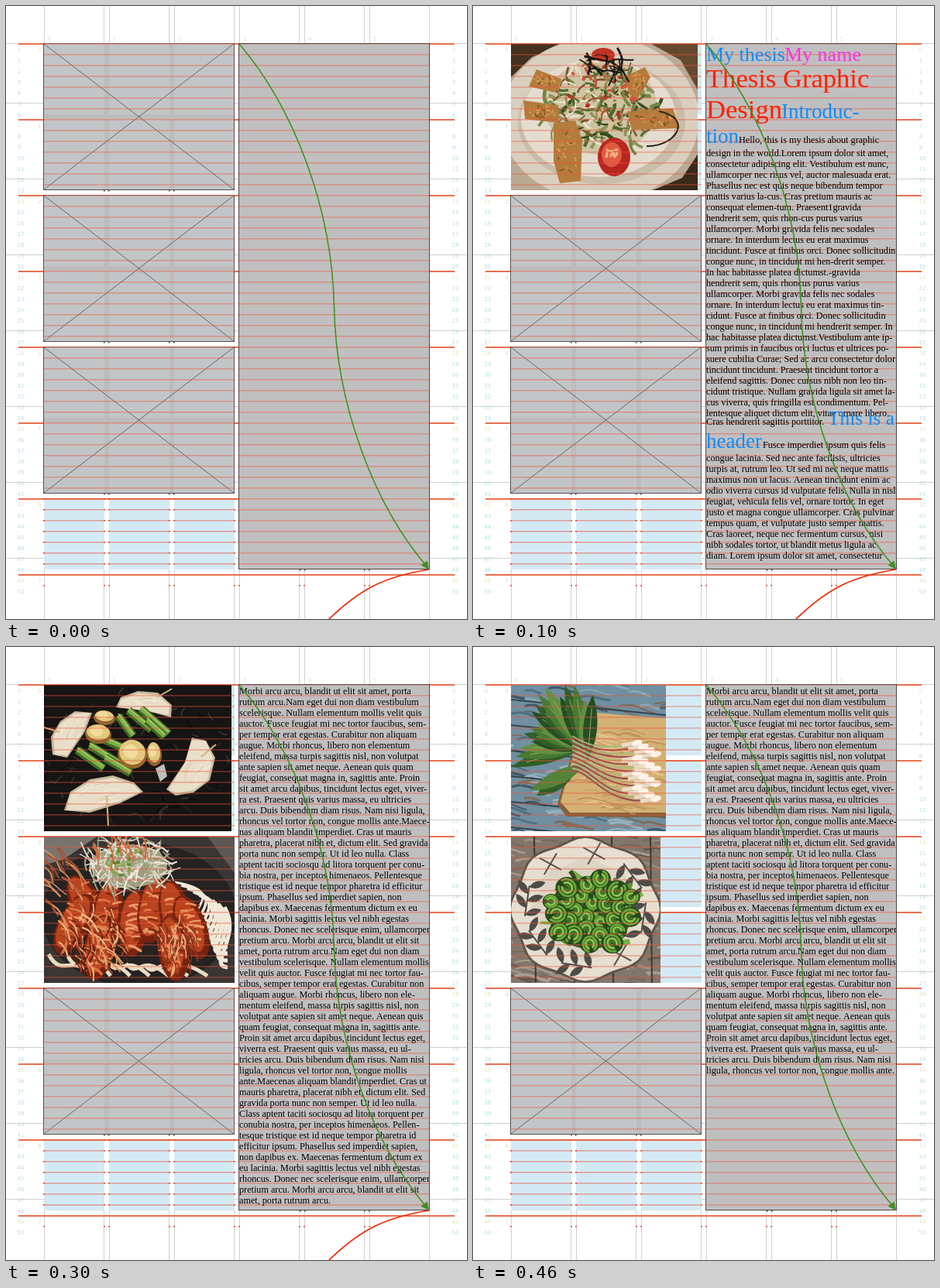
Recreate the animation shown at these times as an HTML page with a canvas. Size 595 px wide and 792 px high, loop 500 ms.

```html
<!DOCTYPE html>
<html lang="la">
<head>
<meta charset="utf-8">
<title>Thesis grid</title>
<style>
html, body { margin: 0; width: 100%; height: 100%; overflow: hidden; background: #fff; }
canvas { display: block; }
</style>
</head>
<body>
<canvas id="stage" width="595" height="792"></canvas>
<script>
const ctx = document.getElementById('stage').getContext('2d');
const SERIF = '"Liberation Serif", "Times New Roman", serif';
const BLUE = '#0c8cf8', PINK = '#ff30e4', RED = '#ff2000';
const LEFT = 49, TOP = 49, ROW = 98, LEAD = 14, TEXT_X = 301;
const columns = [0, 1, 2, 3, 4, 5].map(i => LEFT + 84 * i);

let seed = 1;
const random = () => (seed = seed * 16807 % 2147483647) / 2147483647;
const between = (a, b) => a + (b - a) * random();
const pick = list => list[Math.floor(random() * list.length)];

function rect(color, x, y, w, h) {
  ctx.fillStyle = color;
  ctx.fillRect(x, y, w, h);
}
function poly(color, ...p) {
  ctx.fillStyle = color;
  ctx.beginPath();
  for (let i = 0; i < p.length; i += 2) ctx.lineTo(p[i], p[i + 1]);
  ctx.closePath();
  ctx.fill();
}
function oval(color, x, y, rx, ry, turn = 0) {
  ctx.fillStyle = color;
  ctx.beginPath();
  ctx.ellipse(x, y, rx, ry, turn, 0, 7);
  ctx.fill();
}
function curve(color, width, x, y, ...c) {
  ctx.strokeStyle = color;
  ctx.lineWidth = width;
  ctx.beginPath();
  ctx.moveTo(x, y);
  for (let i = 0; i < c.length; i += 6) ctx.bezierCurveTo(...c.slice(i, i + 6));
  ctx.stroke();
}
function line(color, width, x1, y1, x2, y2) {
  ctx.strokeStyle = color;
  ctx.lineWidth = width;
  ctx.beginPath();
  ctx.moveTo(x1, y1);
  ctx.lineTo(x2, y2);
  ctx.stroke();
}
function write(text, x, y, size, color, font = SERIF) {
  ctx.font = `${size}px ${font}`;
  ctx.fillStyle = color;
  ctx.fillText(text, x, y);
}
// Random strokes inside an ellipse
function strands(n, x, y, rx, ry, colors, length, width, turn = 0, spread = 3.2) {
  for (let i = 0; i < n; i++) {
    const a = random() * 6.283, r = Math.sqrt(random());
    const px = x + rx * r * Math.cos(a), py = y + ry * r * Math.sin(a);
    const b = turn + between(-spread, spread), l = length * between(.4, 1);
    const dx = Math.cos(b) * l / 2, dy = Math.sin(b) * l / 2;
    curve(pick(colors), width * between(.6, 1.2), px - dx, py - dy,
      px + dy * .4, py - dx * .4, px + dy * .3, py, px + dx, py + dy);
  }
}
function leaf(color, x, y, length, width, turn) {
  ctx.save();
  ctx.translate(x, y);
  ctx.rotate(turn);
  ctx.fillStyle = color;
  ctx.beginPath();
  ctx.moveTo(0, 0);
  ctx.quadraticCurveTo(length * .5, -width, length, 0);
  ctx.quadraticCurveTo(length * .5, width, 0, 0);
  ctx.fill();
  ctx.restore();
}

function salad() {
  rect('#b9aa94', 49, 49, 246, 190);
  poly('#46301f', 49, 49, 118, 49, 76, 66, 49, 92);
  poly('#65492f', 230, 49, 291, 49, 291, 110, 268, 70);
  poly('#3b2919', 291, 190, 291, 238, 232, 238, 270, 222);
  oval('#d9cfbf', 164, 146, 128, 106);
  oval('#c9bda9', 166, 150, 108, 80);
  oval('#e4dccf', 162, 145, 100, 76);
  oval('#cfc3a6', 165, 130, 72, 62);
  strands(90, 165, 135, 80, 58, ['#4b6a2c', '#6f8741', '#334d20', '#88965b'], 26, 4);
  strands(130, 165, 125, 62, 58, ['#eee4cf', '#d6bd91', '#a68353', '#78552f', '#526c30'], 24, 2.5);
  strands(22, 168, 105, 45, 40, ['#a83425', '#c6583a'], 10, 5);
  const crust = '#b47b3b';
  poly(crust, 82, 82, 114, 94, 107, 112, 72, 104);
  poly(crust, 65, 122, 110, 128, 111, 151, 67, 146);
  poly(crust, 104, 151, 132, 148, 141, 173, 139, 226, 112, 229, 104, 200);
  poly(crust, 198, 90, 222, 79, 229, 92, 212, 120, 201, 114);
  poly(crust, 199, 136, 258, 132, 267, 158, 205, 160);
  for (const [x, y, w, h] of [[92, 97, 14, 9], [88, 137, 18, 9], [122, 189, 13, 32], [213, 99, 9, 11], [233, 146, 25, 9]])
    strands(26, x, y, w, h, ['#d2a35c', '#8a5526', '#c48c4a'], 7, 2);
  oval('#c03225', 168, 63, 15, 9);
  oval('#b7261f', 182, 195, 21, 25);
  oval('#e05a42', 179, 192, 13, 16);
  strands(8, 180, 192, 8, 12, ['#f0b184'], 9, 3);
  strands(16, 168, 78, 26, 15, ['#171412'], 36, 2.5, .8, 1);
  curve('#28251b', 2, 240, 136, 285, 145, 262, 182, 224, 181);
}

function pastry(x, y, r, turn) {
  for (const [scale, color] of [[1, '#d8ad73'], [.91, '#f2dfba']]) {
    const points = [];
    for (let i = 0; i < 16; i++) {
      const a = turn + i * Math.PI / 8, q = r * scale * (i % 2 ? .74 : between(.95, 1.12));
      points.push(x + q * Math.cos(a), y + q * .78 * Math.sin(a));
    }
    poly(color, ...points);
  }
  strands(38, x, y, r * .7, r * .48, ['#dca45c', '#f8e9c9', '#b9692c'], 22, 5);
  oval('#c77a36', x, y, r * .49, r * .32, turn);
  oval('#693516', x, y, r * .33, r * .21, turn);
  strands(28, x, y, r * .4, r * .25, ['#b36028', '#40200f', '#d99a55', '#7c812f'], 10, 3);
}
function parcels() {
  rect('#17120f', 49, 49, 246, 183);
  oval('#494641', 165, 140, 132, 102);
  oval('#211c18', 166, 137, 123, 94);
  poly('#6c5b49', 49, 49, 82, 49, 64, 71, 49, 78);
  pastry(180, 82, 48, .3);
  pastry(119, 101, 51, .8);
  pastry(101, 157, 59, .2);
  pastry(220, 151, 62, .65);
  poly('#e9c895', 162, 119, 199, 137, 185, 202, 168, 174);
  strands(30, 173, 148, 46, 55, ['#b2601f', '#efd8a9', '#d08c40'], 25, 4);
}

function grill() {
  rect('#171414', 49, 49, 243, 190);
  strands(90, 170, 145, 120, 90, ['#252121', '#0d0b0b', '#37302c'], 16, 2);
  const onion = '#e9dec8', rim = '#c9b89a';
  for (const [color, inset] of [[rim, 0], [onion, 3]]) {
    poly(color, 142 + inset, 78, 148, 65 + inset, 170, 57 + inset, 196, 59 + inset, 214 - inset, 75, 213 - inset, 91 - inset, 180, 82);
    poly(color, 60 + inset, 139, 58 + inset, 116, 70, 96 + inset, 89, 83 + inset, 111 - inset, 85, 102 - inset, 109, 79, 143 - inset);
    poly(color, 75 + inset, 211, 83, 187 + inset, 108, 171 + inset, 138, 166 + inset, 165, 175 + inset, 177 - inset, 187, 147, 202 - inset, 108, 214 - inset);
    poly(color, 207 + inset, 184, 231, 149, 240, 117 + inset, 258, 121, 270 - inset, 143, 263 - inset, 172, 242, 188 - inset, 219, 192 - inset);
  }
  for (const [x, y, r, a] of [[178, 74, 24, .1], [83, 113, 22, -1], [126, 190, 35, -.2], [247, 157, 27, -1]])
    strands(9, x, y, r * .6, r * .4, ['#d4c5a9', '#f7efdc'], r, 1, a, .25);
  const sticks = [[145, 89, 164, 115], [158, 82, 188, 107], [174, 80, 210, 112], [92, 133, 126, 157],
    [108, 127, 147, 151], [112, 113, 157, 133], [128, 143, 161, 163], [182, 95, 205, 116]];
  for (const s of sticks) {
    line('#3d6d25', 11, ...s);
    line('#7eae48', 6, s[0], s[1] - 1, s[2], s[3] - 1);
    line('#acc96a', 1.5, s[0], s[1] - 3, s[2], s[3] - 3);
  }
  for (const [x, y, rx, ry, a] of [[127, 90, 14, 9, .1], [119, 111, 17, 12, .1], [163, 137, 19, 18, .4], [191, 137, 10, 15, -.1]]) {
    oval('#93652d', x, y + 2, rx, ry, a);
    oval('#e2c77d', x, y - 1, rx - 2, ry - 2, a);
    oval('#f0dc9d', x - 2, y - 2, rx * .5, ry * .5, a);
  }
  poly('#bfc0bd', 193, 157, 204, 151, 208, 167, 199, 174);
  line('#d8b47a', 2, 49, 104, 70, 110);
  line('#d8b47a', 2, 130, 192, 132, 231);
  line('#d8b47a', 2, 252, 142, 271, 126);
  line('#d8b47a', 2, 195, 65, 214, 54);
}

function prawns() {
  rect('#393634', 49, 245, 246, 189);
  poly('#79746f', 49, 245, 117, 245, 75, 274, 49, 282);
  poly('#5d5853', 260, 245, 295, 245, 295, 292);
  oval('#252322', 172, 346, 126, 94);
  for (let i = 0; i < 9; i++)
    curve('#f1e8d7', between(3, 6), 218 + i * 8, 304 + i * 4,
      305, 318 + i * 7, 195 + i * 8, 356 + i * 7, 286, 342 + i * 9);
  for (let i = 0; i < 7; i++)
    curve('#e9dbc2', 5, 55 + i * 25, 397 + i * 3, 72 + i * 25, 430, 92 + i * 20, 393, 110 + i * 25, 425);
  const bodies = [[105, 334, -.5], [132, 346, .1], [165, 357, .1], [190, 340, .15], [218, 344, -.2], [239, 362, -.35], [121, 388, .2], [216, 389, -.1], [88, 358, .5]];
  for (const [x, y, a] of bodies) {
    oval('#77230f', x, y, 20, 43, a);
    oval('#b8431e', x - 2, y - 3, 15, 37, a);
    strands(17, x, y, 13, 34, ['#df7640', '#882b13', '#ed9a68'], 19, 3, a, .5);
  }
  strands(80, 112, 378, 42, 42, ['#d78750', '#63200f', '#efbd87', '#9c3b1e'], 35, 2, 1.2, .7);
  strands(42, 218, 385, 26, 34, ['#e7ad78', '#89341d'], 34, 2, 1.5, .5);
  strands(24, 72, 310, 24, 42, ['#d49467', '#a84c27'], 42, 2, .9, .4);
  oval('#a49a7e', 159, 283, 49, 28);
  strands(130, 158, 281, 57, 34, ['#f1eee3', '#c8c7b8', '#9ba57d', '#e1dac6'], 40, 1.8);
  strands(20, 155, 278, 30, 18, ['#59852d', '#83a849'], 8, 4);
  strands(14, 146, 261, 38, 17, ['#c96f43'], 38, 2, 1.1, .4);
}

function wood(x, y, w, h, base, tones) {
  rect(base, x, y, w, h);
  strands(170, x + w / 2, y + h / 2, w * .72, h * .72, tones, 48, 3, .12, .08);
}
function ramps() {
  wood(49, 49, 200, 189, '#708fa0', ['#89a8b5', '#526f83', '#806b57', '#9ab2bb', '#3e5869']);
  for (let y = 68; y < 250; y += 33) line('#35444d', 2, 49, y, 249, y + 20);
  poly('#826038', 143, 84, 249, 94, 249, 220, 121, 219, 109, 203);
  poly('#d4b075', 145, 84, 249, 92, 249, 214, 125, 214, 113, 200);
  strands(65, 190, 160, 58, 56, ['#e2c58f', '#bd9355', '#c9a267'], 45, 2, .1, .08);
  const greens = ['#315e27', '#477a32', '#648f43', '#274d23'];
  for (let i = 0; i < 16; i++) {
    const a = Math.PI * (.91 + i * .041), l = between(72, 105);
    leaf(greens[i % 4], 148, 126 + i * 1.3, l, 18, a);
    line('#8faa62', 1, 148, 126 + i * 1.3, 148 + Math.cos(a) * l * .8, 126 + i * 1.3 + Math.sin(a) * l * .8);
  }
  leaf('#315f28', 133, 158, 61, 20, 2.55);
  leaf('#53833a', 145, 152, 79, 18, 2.7);
  for (let i = 0; i < 16; i++) {
    const y = 126 + i * 4.8, x = 202 + i % 4 * 8;
    curve(i % 2 ? '#9a4c52' : '#a9b878', 2, 128, 115 + i * 3, 153, 130 + i * 2, 170, y + 6, x, y);
    line('#e8dac8', 5, x - 10, y + 1, x + 9, y - 2);
    oval('#fff2e6', x + 10, y - 2, 7, 4, -.2);
  }
}

function ferns() {
  wood(49, 245, 193, 189, '#82766b', ['#9c8f80', '#625950', '#756a60', '#ab9e90']);
  for (let x = 79; x < 242; x += 50) line('#3d3732', 2, x, 245, x + 2, 434);
  const edge = (r, n = 64) => Array.from({ length: n }, (_, i) => {
    const a = i * 2 * Math.PI / n, q = r + 3 * Math.cos(8 * a);
    return [145 + q * Math.cos(a), 339 + q * .96 * Math.sin(a)];
  }).flat();
  poly('#5e554b', ...edge(96));
  poly('#e6decf', ...edge(93));
  poly('#ded4c4', ...edge(67));
  for (let i = 0; i < 8; i++) {
    const a = i * Math.PI / 4 + .15;
    const x = 145 + 76 * Math.cos(a), y = 339 + 73 * Math.sin(a);
    if (i % 4 === 1 || i === 6) {
      for (const turn of [.5, 2.1]) line('#55524a', 2, x - 16 * Math.cos(turn), y - 16 * Math.sin(turn), x + 16 * Math.cos(turn), y + 16 * Math.sin(turn));
      continue;
    }
    line('#4d4c47', 2, x - 20 * Math.sin(a), y + 20 * Math.cos(a), x + 20 * Math.sin(a), y - 20 * Math.cos(a));
    for (let j = -2; j < 3; j++)
      leaf('#4d4c47', x - j * 9 * Math.sin(a), y + j * 9 * Math.cos(a), 22, 9, a + (j % 2 ? .8 : 2.7));
  }
  oval('#3f532b', 151, 344, 54, 46);
  strands(45, 151, 342, 58, 50, ['#314e20', '#5c9135', '#78ad46'], 34, 6);
  for (let i = 0; i < 27; i++) {
    const a = i * 2.4, q = 11 * Math.sqrt(i), x = 153 + q * Math.cos(a), y = 343 + q * .85 * Math.sin(a);
    const r = between(9, 14);
    oval('#28471b', x, y, r + 1, r);
    for (const [k, color] of [[.82, '#65a638'], [.49, '#8bc450'], [.2, '#46752b']]) {
      ctx.strokeStyle = color;
      ctx.lineWidth = 3;
      ctx.beginPath();
      ctx.ellipse(x, y, r * k, r * k * .9, a, 0, 5.6);
      ctx.stroke();
    }
  }
}

const dishes = [
  [],
  [[salad, 49, 241, 189]],
  [[parcels, 49, 246, 182]],
  [[grill, 49, 242, 189], [prawns, 245, 246, 189]],
  [[ramps, 49, 200, 189], [ferns, 245, 193, 189]]
];

const opening = `design in the world.Lorem ipsum dolor sit amet,
consectetur adipiscing elit. Vestibulum est nunc,
ullamcorper nec risus vel, auctor malesuada erat.
Phasellus nec est quis neque bibendum tempor
mattis varius la-cus. Cras pretium mauris ac
consequat elemen-tum. Praesent1gravida
hendrerit sem, quis rhon-cus purus varius
ullamcorper. Morbi gravida felis nec sodales
ornare. In interdum lectus eu erat maximus
tincidunt. Fusce at finibus orci. Donec sollicitudin
congue nunc, in tincidunt mi hen-drerit semper.
In hac habitasse platea dictumst.-gravida
hendrerit sem, quis rhoncus purus varius
ullamcorper. Morbi gravida felis nec sodales
ornare. In interdum lectus eu erat maximus tin-
cidunt. Fusce at finibus orci. Donec sollicitudin
congue nunc, in tincidunt mi hendrerit semper. In
hac habitasse platea dictumst.Vestibulum ante ip-
sum primis in faucibus orci luctus et ultrices po-
suere cubilia Curae; Sed ac arcu consectetur dolor
tincidunt tincidunt. Praesent tincidunt tortor a
eleifend sagittis. Donec cursus nibh non leo tin-
cidunt tristique. Nullam gravida ligula sit amet la-
cus viverra, quis fringilla est condimentum. Pel-
lentesque aliquet dictum elit, vitae ornare libero.`;
const section = `congue lacinia. Sed nec ante facilisis, ultricies
turpis at, rutrum leo. Ut sed mi nec neque mattis
maximus non ut lacus. Aenean tincidunt enim ac
odio viverra cursus id vulputate felis. Nulla in nisl
feugiat, vehicula felis vel, ornare tortor. In eget
justo et magna congue ullamcorper. Cras pulvinar
tempus quam, et vulputate justo semper mattis.
Cras laoreet, neque nec fermentum cursus, nisi
nibh sodales tortor, ut blandit metus ligula ac
diam. Lorem ipsum dolor sit amet, consectetur`;
const subsection = `eros nisl, scelerisque a libero vel, suscipit porttitor
felis. Nulla nec lacinia nisl. Phasellus molestie leo
in sem tristique, et vulputate orci blandit. Ut con-
sequat fringilla iaculis. Proin nulla nibh, dapibus
at eleifend rhoncus, iaculis at leo. Ut bibendum
semper gravida. Sed tincidunt eget lorem in ele-
mentum. Vivamus et ullamcorper sapien. Duis
molestie dignissim pellentesque. Quisque congue
volutpat suscipit.Maecenas aliquam blandit im-
perdiet. Cras ut mauris pharetra, placerat nibh et,
dictum elit. Sed gravida porta nunc non semper.
Ut id leo nulla. Class aptent taciti sociosqu ad lito-
ra torquent per conubia nostra, per inceptos
himenaeos. Pellentesque tristique est id neque
tempor pharetra id efficitur ipsum. Phasellus sed
imperdiet sapien, non dapibus ex. Maecenas fer-
mentum dictum ex eu lacinia. Morbi sagittis lectus
vel nibh egestas rhoncus. Donec nec scelerisque
enim, ullamcorper pretium arcu. Morbi arcu arcu,
blandit ut elit sit amet, porta rutrum arcu.Nam
eget dui non diam vestibulum scelerisque. Nullam
elementum mollis velit quis auctor. Fusce feugiat
mi nec tortor faucibus, semper tempor erat eges-
tas. Curabitur non aliquam augue. Morbi rhoncus,
libero non elementum eleifend, massa turpis sag-
ittis nisl, non volutpat ante sapien sit amet neque.
Aenean quis quam feugiat, consequat magna in,
sagittis ante. Proin sit amet arcu dapibus, tin-
cidunt lectus eget, viverra est. Praesent quis varius
massa, eu ultricies arcu. Duis bibendum diam ris-
us. Nam nisi ligula, rhoncus vel tortor non, congue
mollis ante.Maecenas aliquam blandit imperdiet.
Cras ut mauris pharetra, placerat nibh et, dictum
elit. Sed gravida porta nunc non semper. Ut id leo
nulla. Class aptent taciti sociosqu ad litora
torquent per conubia nostra, per inceptos hime-
naeos. Pellentesque tristique est id neque tempor
pharetra id efficitur ipsum. Phasellus sed imperdi-
et sapien, non dapibus ex. Maecenas fermentum
dictum ex eu lacinia. Morbi sagittis lectus vel nibh
egestas rhoncus. Donec nec scelerisque enim, ul-
lamcorper pretium arcu. Morbi arcu arcu, blandit
ut elit sit amet, porta rutrum arcu.`;
const closing = `Morbi arcu arcu, blandit ut elit sit amet, porta
rutrum arcu.Nam eget dui non diam vestibulum
scelerisque. Nullam elementum mollis velit quis
auctor. Fusce feugiat mi nec tortor faucibus, sem-
per tempor erat egestas. Curabitur non aliquam
augue. Morbi rhoncus, libero non elementum
eleifend, massa turpis sagittis nisl, non volutpat
ante sapien sit amet neque. Aenean quis quam
feugiat, consequat magna in, sagittis ante. Proin
sit amet arcu dapibus, tincidunt lectus eget, viver-
ra est. Praesent quis varius massa, eu ultricies
arcu. Duis bibendum diam risus. Nam nisi ligula,
rhoncus vel tortor non, congue mollis ante.Maece-
nas aliquam blandit imperdiet. Cras ut mauris
pharetra, placerat nibh et, dictum elit. Sed gravida
porta nunc non semper. Ut id leo nulla. Class
aptent taciti sociosqu ad litora torquent per conu-
bia nostra, per inceptos himenaeos. Pellentesque
tristique est id neque tempor pharetra id efficitur
ipsum. Phasellus sed imperdiet sapien, non
dapibus ex. Maecenas fermentum dictum ex eu
lacinia. Morbi sagittis lectus vel nibh egestas
rhoncus. Donec nec scelerisque enim, ullamcorper
pretium arcu. Morbi arcu arcu, blandit ut elit sit
amet, porta rutrum arcu.Nam eget dui non diam
vestibulum scelerisque. Nullam elementum mollis
velit quis auctor. Fusce feugiat mi nec tortor fau-
cibus, semper tempor erat egestas. Curabitur non
aliquam augue. Morbi rhoncus, libero non ele-
mentum eleifend, massa turpis sagittis nisl, non
volutpat ante sapien sit amet neque. Aenean quis
quam feugiat, consequat magna in, sagittis ante.
Proin sit amet arcu dapibus, tincidunt lectus eget,
viverra est. Praesent quis varius massa, eu ul-
tricies arcu. Duis bibendum diam risus. Nam nisi
ligula, rhoncus vel tortor non, congue mollis
ante.Maecenas aliquam blandit imperdiet. Cras ut
mauris pharetra, placerat nibh et, dictum elit. Sed
gravida porta nunc non semper. Ut id leo nulla.
Class aptent taciti sociosqu ad litora torquent per
conubia nostra, per inceptos himenaeos. Pellen-
tesque tristique est id neque tempor pharetra id
efficitur ipsum. Phasellus sed imperdiet sapien,
non dapibus ex. Maecenas fermentum dictum ex
eu lacinia. Morbi sagittis lectus vel nibh egestas
rhoncus. Donec nec scelerisque enim, ullamcorper
pretium arcu. Morbi arcu arcu, blandit ut elit sit
amet, porta rutrum arcu.`;

const body = (text, y, x = TEXT_X) =>
  text.split('\n').forEach((row, i) => write(row, x, y + i * LEAD, 12.2, '#000'));
const heading = (text, x, y, color, size = 26) => write(text, x, y, size, color);

const pages = [
  () => {},
  () => {
    heading('My thesis', 301, 71, BLUE);
    heading('My name', 402, 71, PINK);
    heading('Thesis Graphic', 301, 105, RED, 34.6);
    heading('Design', 301, 145, RED, 34.6);
    heading('Introduc-', 398, 145, BLUE, 27);
    heading('tion', 301, 177, BLUE, 27);
    body('Hello, this is my thesis about graphic', 177, 343);
    body(opening, 194);
    body('Cras hendrerit sagittis porttitor.', 541);
    heading('This is a', 458, 541, BLUE, 25.4);
    heading('header', 301, 571, BLUE, 27);
    body('Fusce imperdiet ipsum quis felis', 571, 374);
    body(section, 588);
  },
  () => {
    body('sit amet, consectetur adipiscing elit. Pellentesque\nvel arcu id libero finibus rutrum non at arcu.', 61);
    heading('This is a subheader', 301, 99, PINK, 26.4);
    body('Morbi', 99, 504);
    body(subsection, 116);
  },
  () => body(closing, 61),
  () => body(closing.split('\n').slice(0, 36).join('\n') + ' ante.', 61)
];

function grid() {
  rect('#fff', 0, 0, 595, 792);
  for (const y of [48, 125, 223, 321, 419, 517, 615, 713]) rect('#d0d0d0', 0, y, 595, 1);
  for (const x of columns) {
    rect('#d0d0d0', x, 0, 1, 792);
    rect('#d0d0d0', x + 77, 0, 1, 792);
  }
  rect('#fff', LEFT, TOP, 246, 679);
  for (let r = 0; r < 7; r++)
    for (const x of columns.slice(0, 3)) rect('#d3eaf5', x, TOP + r * ROW, 78, 91);
  for (let r = 0; r < 8; r++) rect('#e8704f', 16, 48 + r * ROW, 563, 2);

  const sans = '"DejaVu Sans", sans-serif';
  ctx.textAlign = 'center';
  for (let i = 0; i <= 50; i++) {
    const color = i % 7 ? '#b5e0dc' : '#e0e6bd';
    for (const x of [19, 580]) write(i, i < 10 ? x - 2 : x, 59 + i * LEAD, 7, color, sans);
  }
  for (let i = 0; i < 8; i++) write(i, 43.5, 59 + i * ROW, 7, '#dedfc0', sans);
  columns.forEach((x, i) => write(i, x + 7, 45, 7, '#dedfc0', sans));
  ctx.textAlign = 'left';
}

function placeholder(y) {
  rect('#bfbbbb', LEFT, y, 245, 189);
  for (const x of columns.slice(0, 3))
    for (const dy of [0, ROW]) rect('#c2c5c7', x, y + dy, 78, 91);
  ctx.strokeStyle = '#5a5050';
  ctx.lineWidth = 1;
  ctx.strokeRect(48.5, y - .5, 246, 189);
  line('#666', 1, LEFT, y, 294, y + 188);
  line('#666', 1, 294, y, LEFT, y + 188);
}

function draw(step) {
  grid();
  dishes[step].forEach(([paint, y, w, h], i) => {
    seed = 97 + step * 31 + i;
    ctx.save();
    ctx.beginPath();
    ctx.rect(LEFT, y, w, h);
    ctx.clip();
    paint();
    ctx.restore();
  });
  for (let i = dishes[step].length; i < 3; i++) placeholder(TOP + i * 196);
  rect('#c0bfbf', TEXT_X, TOP, 245, 679);

  for (let i = 0; i < 49; i++) {
    const y = 48 + i * LEAD;
    if (i < 42) rect('rgba(235,85,60,.43)', LEFT, y, 246, 1.6);
    else for (const x of columns.slice(0, 3)) {
      rect('rgba(235,85,60,.5)', x, y, 78, 1.6);
      rect('#e5482c', x - 1, y, 2, 1.6);
      rect('#e5482c', x + 77, y, 2, 1.6);
    }
    rect('rgba(235,85,60,.43)', TEXT_X, y, 246, 1.6);
  }
  for (const x of columns) {
    rect('#e5482c', x - 1, 748, 2, 1.5);
    if (x < 469) rect('#e5482c', x + 77, 748, 2, 1.5);
  }
  for (let i = dishes[step].length; i < 3; i++)
    for (const x of [126, 132, 210, 216]) rect('#333', x, 238 + i * 196, 1.5, 1.5);

  pages[step]();
  ctx.strokeStyle = '#504646';
  ctx.lineWidth = 1;
  ctx.strokeRect(300.5, 48.5, 246, 679);
  for (const x of [379, 385, 462, 468]) rect('#333', x, 728, 1.5, 1.5);
  curve('#3f9126', 1.6, 301, 49, 372, 132, 421, 262, 423.5, 388.5, 426, 515, 475, 645, 544, 725);
  poly('#3f9126', 546, 728, 535.5, 722.5, 543.5, 716.5);
  if (step < 4) curve('#f02800', 1.7, 546, 728, 490, 737, 458, 752, 416, 793);
}

let shown = -1;
function tick(now) {
  const step = Math.floor(now / 100) % 5;
  if (step !== shown) draw(shown = step);
  requestAnimationFrame(tick);
}
tick(0);
</script>
</body>
</html>
```
